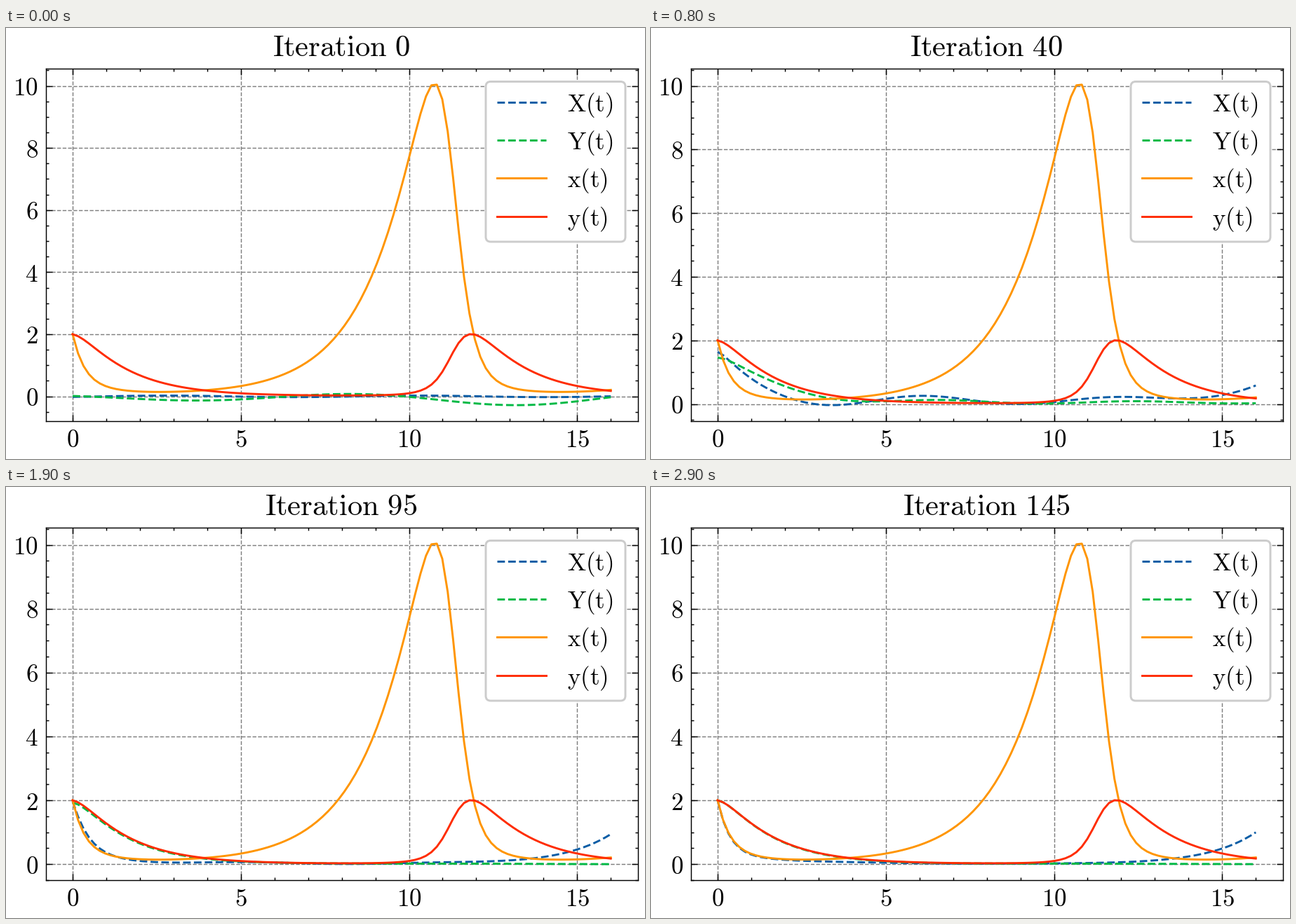
Write a matplotlib script that moves like this. It is 911 by 615 pixels and loops after 3000 ms.

```python
import numpy as np
import matplotlib.pyplot as plt
from matplotlib.animation import FuncAnimation
from matplotlib.lines import Line2D
from matplotlib.patches import FancyBboxPatch
from matplotlib.ticker import MultipleLocator

W, H, DPI = 911, 615, 128
PX = 72 / DPI                # points per pixel
LINE, THIN, EM = 2.92, 1.46, 35
LEFT, RIGHT, TOP, BOTTOM = 56.6, 900.6, 58, 561
BLUE, GREEN, ORANGE, RED = "#0C5DA5", "#00B945", "#FF9500", "#FF2C00"
FRAMES, STEP = 30, 5
WARMUP = 15                  # iterations until the fit takes shape

plt.rcParams["mathtext.fontset"] = "cm"


def predator_prey(times, substeps=20):
    """Lotka-Volterra solution from (2, 2) by Runge-Kutta."""
    def rate(s):
        x, y = s
        return np.array([x * (.7 - 1.507 * y), y * (.3 * x - .7)])

    s = np.array([2.0, 2.0])
    h = (times[1] - times[0]) / substeps
    path = [s]
    for _ in times[1:]:
        for _ in range(substeps):
            k1 = rate(s)
            k2 = rate(s + h / 2 * k1)
            k3 = rate(s + h / 2 * k2)
            k4 = rate(s + h * k3)
            s = s + h / 6 * (k1 + 2 * k2 + 2 * k3 + k4)
        path.append(s)
    return np.array(path).T


t = np.linspace(0, 16, 100)
x_true, y_true = predator_prey(t)
peak = x_true.max()
y_decay = np.minimum.accumulate(y_true) * (1 - (t / 16)**2)


def wave(period, crest):
    return np.cos(2 * np.pi * (t - crest) / period)


def ripple(n, size, fade, trough):
    """Oscillation that dies out along t and over training."""
    size = size * np.exp((WARMUP - n) / fade)
    return size * (1 - np.exp(-t)) * (.45 - np.exp(-t / 12) * wave(5.75, trough))


def start_value(n, dip, worst, width):
    return 2 - dip * np.exp(-((n - worst) / width)**2)


def fit_x(n):
    slow = .3 * n / 145
    width = max(.36, 1.35 - .009 * n)
    power = 1 + np.exp(-n / 30)
    drop = (start_value(n, .36, 40, 35) - slow) * np.exp(-(t / width)**power)
    tail = (1 - np.exp(-(n / 52)**1.5)) * np.exp((t - 16) / 1.4)
    return drop + slow * np.exp(-t / 2.4) + ripple(n, .55, 30, 3.9 - .015 * n) + tail


def fit_y(n):
    return start_value(n, .57, 30, 45) / 2 * y_decay + ripple(n, .4, 18, 3.9)


x_untrained = .025 * wave(7.5, 10.3)
y_untrained = -.02 - .0055 * t - (.06 + .01 * t) * wave(9.7, 3.3)


def fitted(fit, untrained, iteration):
    learned = min(iteration / WARMUP, 1)
    return untrained + learned * (fit(max(iteration, WARMUP)) - untrained)


def roman(text):
    return r"$\mathrm{%s}$" % text.replace(" ", r"\ ")


fig = plt.figure(figsize=(W / DPI, H / DPI), dpi=DPI, facecolor="white")
ax = fig.add_axes([LEFT / W, 1 - BOTTOM / H, (RIGHT - LEFT) / W, (BOTTOM - TOP) / H])
ax.set_xlim(-.8, 16.8)
ax.set_axisbelow(True)
for axis, major, minor in ((ax.xaxis, 5, 1), (ax.yaxis, 2, .5)):
    axis.set_major_locator(MultipleLocator(major))
    axis.set_minor_locator(MultipleLocator(minor))
    axis.set_major_formatter(lambda v, pos: roman("%d" % round(v)))
ax.tick_params(which="both", direction="in", top=True, right=True, width=THIN * PX)
ax.tick_params(which="major", length=8.75 * PX, labelsize=EM * PX)
ax.tick_params(which="minor", length=4.4 * PX)
ax.tick_params(axis="x", pad=10 * PX)
ax.tick_params(axis="y", pad=10.8 * PX)
ax.grid(color="black", alpha=.5, linestyle="--", linewidth=THIN * PX)
for spine in ax.spines.values():
    spine.set_linewidth(THIN * PX)

style = dict(linewidth=LINE * PX)
x_line, = ax.plot(t, 0 * t, "--", color=BLUE, **style)
y_line, = ax.plot(t, 0 * t, "--", color=GREEN, **style)
ax.plot(t, x_true, color=ORANGE, **style)
ax.plot(t, y_true, color=RED, **style)

# Overlay in pixels, y pointing down
top = fig.add_axes([0, 0, 1, 1])
top.set(xlim=(0, W), ylim=(H, 0))
top.axis("off")
title = top.text(478, 40.5, "", fontsize=42.7 * PX, ha="center", va="baseline")
top.add_patch(FancyBboxPatch((684, 76.5), 199, 228.5, facecolor="white", edgecolor="0.8",
                             boxstyle="round,pad=0,rounding_size=7", **style))
entries = (("X(t)", BLUE, "--"), ("Y(t)", GREEN, "--"), ("x(t)", ORANGE, "-"), ("y(t)", RED, "-"))
for i, (name, color, dash) in enumerate(entries):
    y = 106 + 54.2 * i
    top.add_line(Line2D([700, 770], [y, y], color=color, linestyle=dash, **style))
    top.text(799.8, y + 13, roman(name), fontsize=EM * PX, va="baseline")


def update(frame):
    iteration = STEP * frame
    xs = fitted(fit_x, x_untrained, iteration)
    ys = fitted(fit_y, y_untrained, iteration)
    x_line.set_ydata(xs)
    y_line.set_ydata(ys)
    low = min(xs.min(), ys.min())
    pad = .05 * (peak - low)
    ax.set_ylim(low - pad, peak + pad)
    title.set_text(roman("Iteration %d" % iteration))
    return x_line, y_line, title


anim = FuncAnimation(fig, update, frames=FRAMES, interval=100, repeat=True, repeat_delay=0, blit=False)
plt.show()
```
